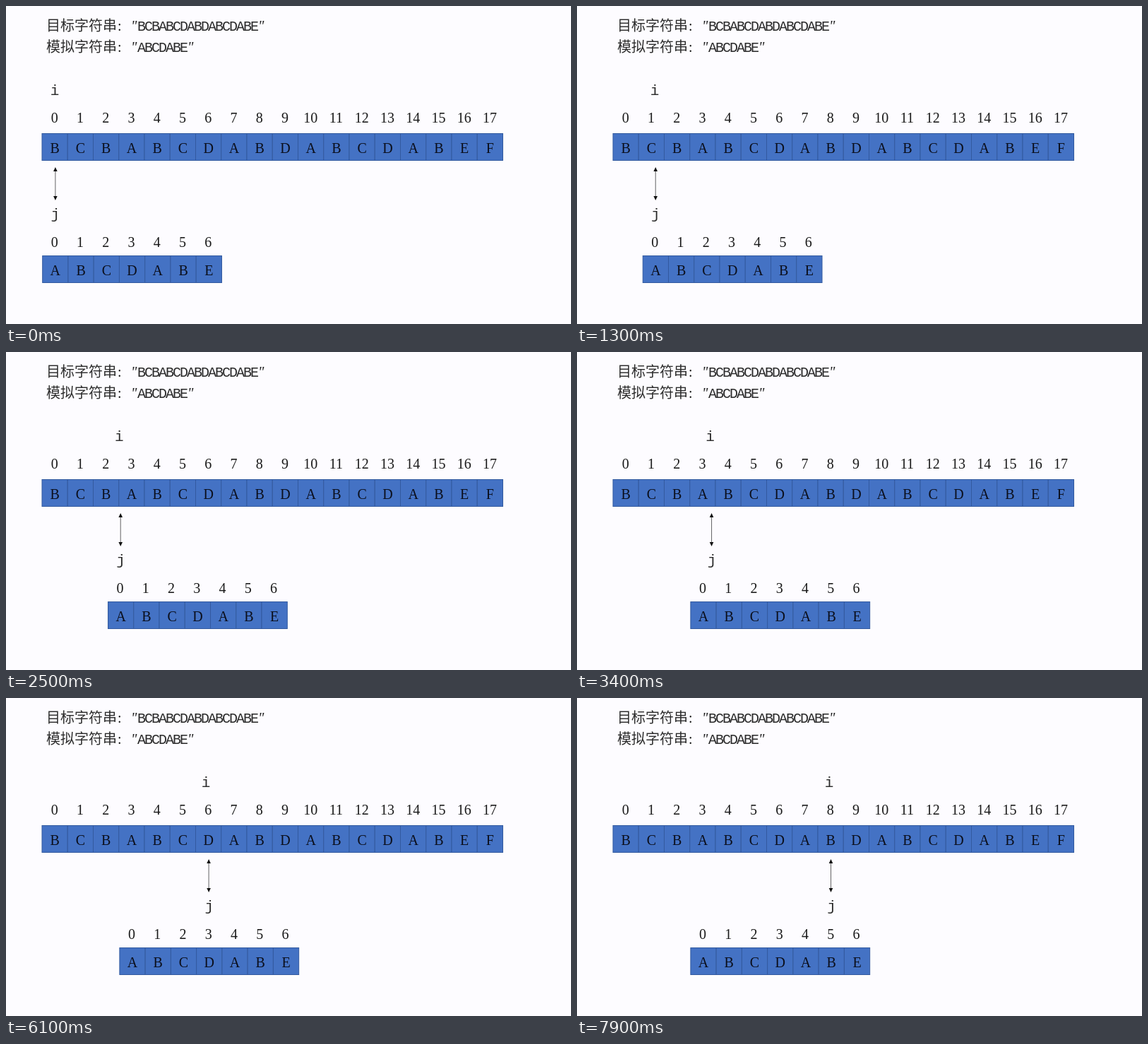
Animation of 800 by 450 pixels, one loop 8 s. Source, as an HTML page:

```html
<!DOCTYPE html>
<html lang="zh-CN">
<head>
<meta charset="utf-8">
<title>KMP</title>
<style>
  html, body { margin: 0; width: 100%; height: 100%; overflow: hidden; background: #fdfcff; }
  svg { display: block; width: 800px; height: 450px; }
  text { font-family: "Liberation Serif", "Noto Serif", serif; font-size: 20px; fill: #1a1a1a; }
  .mid { text-anchor: middle; }
  .han { font-family: "Noto Sans CJK SC", "Noto Sans CJK", sans-serif; font-weight: 300; fill: #2c2c2c; }
  .code, .pointer { font-family: "Liberation Mono", monospace; }
  .code { letter-spacing: -2px; fill: #2c2c2c; }
  .quote { font-style: italic; }
  .letter { fill: #0b0f1c; }
  .pointer { font-size: 21px; fill: #2c2c2c; }
  rect { fill: #4472c4; stroke: #335a9f; stroke-width: 1; }
</style>
</head>
<body>
<svg viewBox="0 0 800 450">
  <g id="titles"></g>
  <g id="target"></g>
  <g id="pattern"></g>
  <text id="i" class="mid pointer" y="126">i</text>
  <g id="arrow" fill="#111">
    <path d="M0 231V272" stroke="#222" stroke-width="0.7"/>
    <path d="M0 228l-2.8 6h5.6zM0 275l-2.8-6h5.6z"/>
  </g>
  <text id="j" class="mid pointer" y="301">j</text>
</svg>
<script>
  const NS = 'http://www.w3.org/2000/svg';
  const CELL = 36.25;
  const LOOP = 8000, STEP = 100, MOVE = 600;
  const starts = [250, 1215, 2170, 3200, 4200, 5200, 6200, 7200];
  const iStops = [69, 105, 140, 177, 212, 246, 283, 320, 357];
  const byId = id => document.getElementById(id);

  function add(parent, tag, attrs, content = '') {
    const el = document.createElementNS(NS, tag);
    for (const key in attrs) el.setAttribute(key, attrs[key]);
    el.textContent = content;
    parent.append(el);
  }

  function title(label, word, y) {
    const put = (cls, x, s) => add(byId('titles'), 'text', { class: cls, x, y }, s);
    put('han', 57, label);
    put('', 158, ':');
    put('quote', 177, '"');
    put('code', 186, word);
    put('quote', 187 + word.length * 10, '"');
  }

  function row(id, word, left, top, indexY, letterY) {
    const group = byId(id);
    [...word].forEach((letter, n) => {
      const x = left + n * CELL, center = x + CELL / 2;
      add(group, 'rect', { x, y: top, width: CELL, height: 38 });
      add(group, 'text', { class: 'mid', x: 68.7 + n * CELL, y: indexY }, n);
      add(group, 'text', { class: 'mid letter', x: center, y: letterY }, letter);
    });
  }

  title('目标字符串', 'BCBABCDABDABCDABE', 35);
  title('模拟字符串', 'ABCDABE', 65);
  row('target', 'BCBABCDABDABCDABEF', 51, 180.5, 165, 208);
  row('pattern', 'ABCDABE', 51.7, 353.5, 341, 381);

  const clamp = v => Math.min(1, Math.max(0, v));
  const shift = (id, x) => byId(id).setAttribute('transform', `translate(${x.toFixed(2)} 0)`);

  function draw(t) {
    // Cells travelled so far: linear moves with pauses between them.
    const pos = starts.reduce((sum, s) => sum + clamp((t - s) / MOVE), 0);
    const n = Math.min(7, Math.floor(pos));
    shift('i', iStops[n] + (iStops[n + 1] - iStops[n]) * (pos - n));
    shift('arrow', 69.9 + 36.2 * pos);
    shift('j', 69.8 + 36.35 * pos);
    shift('pattern', 36.4 * Math.min(pos, 3));
  }

  const origin = performance.now();
  function tick() {
    const t = (performance.now() - origin) % LOOP;
    draw(Math.floor(t / STEP) * STEP);
    requestAnimationFrame(tick);
  }
  tick();
</script>
</body>
</html>
```
